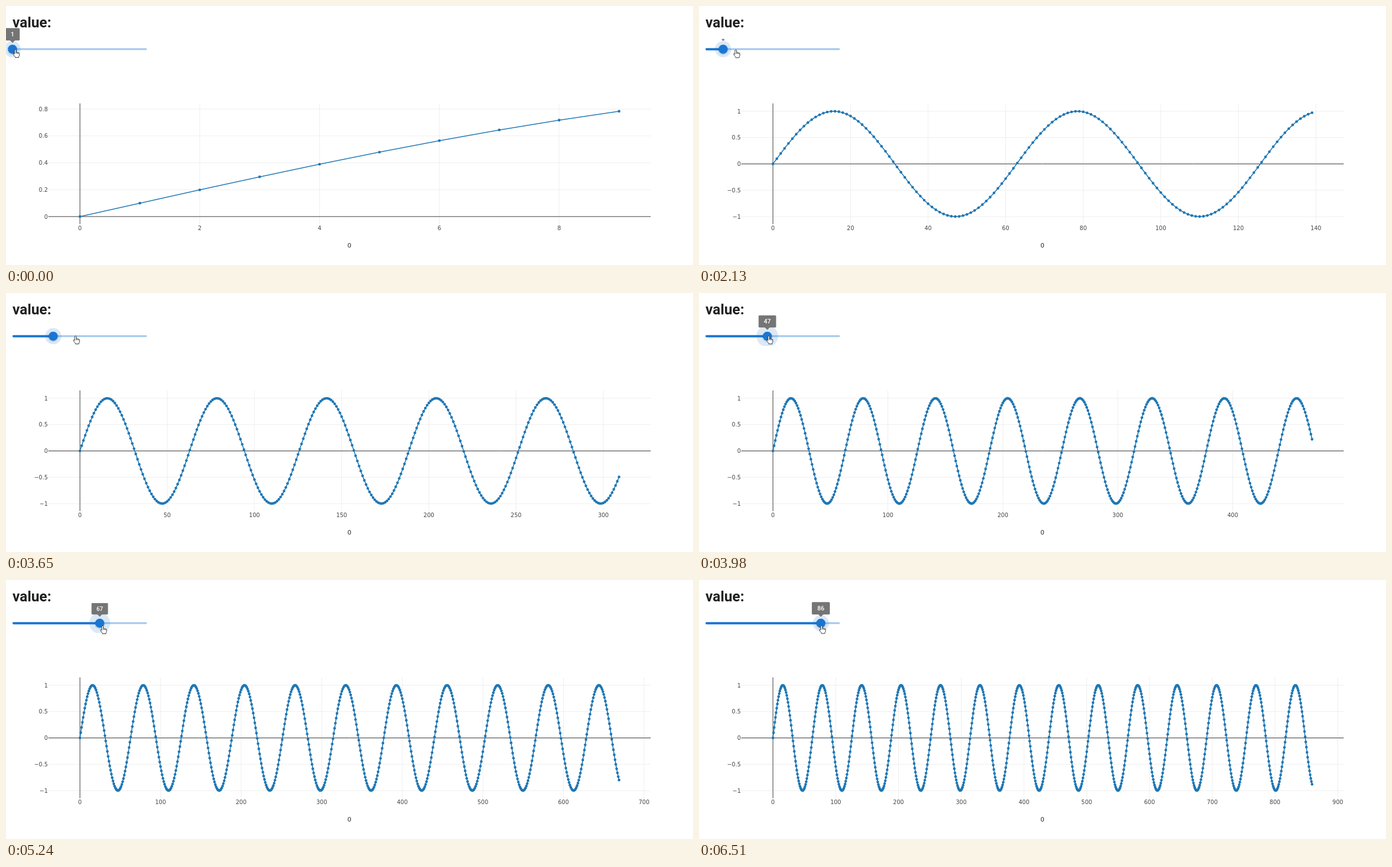
These frames come from a looping animation (1217 px wide and 460 px high, 7970 ms). An HTML page with a canvas:

```html
<!DOCTYPE html>
<html lang="en">
<head>
<meta charset="utf-8">
<title>Slider and sine plot</title>
<style>
  html, body { margin: 0; width: 100%; height: 100%; overflow: hidden; background: #fff; }
  canvas { display: block; }
</style>
</head>
<body>
<canvas id="stage" width="1217" height="460"></canvas>
<script>
const ctx = document.getElementById('stage').getContext('2d');
const LOOP = 7970, BLUE = '#1976d2', PLOT_BLUE = '#1f77b4';
const PLOT = { left: 75, right: 1142, top: 173, bottom: 387.5, x0: 131, x1: 1086, yMax: 187, yMin: 374 };
const SLIDER_Y = 76.7;

// press: click time, leave: pointer moves off, pulse: length of the halo swell
const steps = [
  { value: 1, press: -1000, leave: 580, pulse: 1 },
  { value: 14, press: 1320, leave: 1910, pulse: 130 },
  { value: 31, press: 2700, leave: 3240, pulse: 170 },
  { value: 47, press: 3860, leave: 4370, pulse: 260 },
  { value: 67, press: 5140, leave: 5560, pulse: 150 },
  { value: 86, press: 6335, leave: 1e6, pulse: 160 }
];
// time, fingertip x, fingertip y
const pointerPath = [
  [0, 16.5, 77], [580, 16.5, 77], [1260, 42.3, 79], [1910, 42.3, 79],
  [2650, 84.5, 76], [3240, 84.5, 76], [3710, 123.5, 76], [4370, 123.5, 76],
  [4980, 171, 81], [5560, 171, 81], [5840, 202.3, 75], [6310, 217, 80.5], [LOOP, 217, 80.5]
];

const clamp = k => Math.min(1, Math.max(0, k));
const ease = k => 1 - (1 - clamp(k)) ** 2.2;
const mix = (a, b, k) => a + (b - a) * k;
const thumbX = value => 11.5 + (value - 1) * 2.404;

function line(x1, y1, x2, y2, color, width = 1) {
  ctx.strokeStyle = color;
  ctx.lineWidth = width;
  ctx.beginPath();
  ctx.moveTo(x1, y1);
  ctx.lineTo(x2, y2);
  ctx.stroke();
}

function disc(x, y, r, color) {
  ctx.fillStyle = color;
  ctx.beginPath();
  ctx.arc(x, y, r, 0, 7);
  ctx.fill();
}

function text(str, x, y, font, color, align = 'center') {
  ctx.font = font;
  ctx.fillStyle = color;
  ctx.textAlign = align;
  ctx.fillText(str, x, y);
}

// Round tick spacing of the 1-2-5 series
function tickStep(rough) {
  const base = 10 ** Math.floor(Math.log10(rough));
  return base * [1, 2, 5, 10].find(m => m * base >= rough);
}

function ticks(step, from, to) {
  const list = [];
  for (let i = Math.ceil(from / step); i * step <= to; i++) list.push(i * step);
  return list;
}

function drawPlot(value) {
  const last = value * 10 - 1;
  const data = Array.from({ length: last + 1 }, (_, i) => Math.sin(i / 10));
  const low = Math.min(...data), high = Math.max(...data);
  const px = v => PLOT.x0 + v / last * (PLOT.x1 - PLOT.x0);
  const py = v => mix(PLOT.yMin, PLOT.yMax, (v - low) / (high - low));
  const label = v => String(+v.toFixed(2)).replace('-', '\u2212');
  const font = '10px "DejaVu Sans", sans-serif';
  const pad = (high - low) * 0.073;

  for (const v of ticks(tickStep(last * 1.117 / 9.9), 0, last * 1.0586)) {
    const x = px(v);
    if (v) line(x, PLOT.top, x, PLOT.bottom, '#eee');
    text(label(v), x, 398, font, '#444');
  }
  for (const v of ticks(high > 0.9 ? 0.5 : 0.2, low - pad, high + pad)) {
    const y = py(v);
    if (v) line(PLOT.left, y, PLOT.right, y, '#eee');
    text(label(v), 74, y + 3.7, font, '#444', 'right');
  }
  line(PLOT.left, py(0), PLOT.right, py(0), '#333');
  line(PLOT.x0, PLOT.top, PLOT.x0, PLOT.bottom, '#333');

  ctx.strokeStyle = PLOT_BLUE;
  ctx.lineWidth = 1.6;
  ctx.lineJoin = 'round';
  ctx.beginPath();
  data.forEach((v, i) => ctx.lineTo(px(i), py(v)));
  ctx.stroke();
  data.forEach((v, i) => disc(px(i), py(v), 2.4, PLOT_BLUE));
  text('0', 608.3, 429, '11.2px "DejaVu Sans", sans-serif', '#2a3038');
}

function drawTooltip(x, value, scale) {
  if (scale < 0.02) return;
  const width = value < 10 ? 25.6 : 31.9;
  ctx.save();
  ctx.translate(x, 61.2);
  ctx.scale(scale, scale);
  ctx.fillStyle = '#757575';
  ctx.beginPath();
  ctx.roundRect(-width / 2, -22, width, 22, 1.6);
  ctx.fill();
  ctx.beginPath();
  ctx.moveTo(-4.5, -0.2);
  ctx.lineTo(4.5, -0.2);
  ctx.lineTo(0, 4.4);
  ctx.fill();
  text(value, 0, -7.2, '500 11.2px Roboto, sans-serif', '#fff');
  ctx.restore();
}

function drawSlider(t, index) {
  const step = steps[index], previous = steps[Math.max(0, index - 1)];
  const grow = ease((t - step.press) / 150);
  const hide = ease((t - step.leave - 130) / 150);
  const x = mix(thumbX(previous.value), thumbX(step.value), grow);
  const focus = index === 0 ? 1 - hide : index === 1 ? grow : 1;
  const swell = Math.sin(Math.PI * clamp((t - step.press) / step.pulse));

  ctx.lineCap = 'round';
  line(13, SLIDER_Y, 248, SLIDER_Y, '#a7caed', 3.2);
  if (x > 13.5) line(13.5, SLIDER_Y, x, SLIDER_Y, BLUE, 4);
  ctx.lineCap = 'butt';

  ctx.save();
  ctx.beginPath();
  ctx.rect(0, 0, 1217, 94);
  ctx.clip();
  disc(x, SLIDER_Y, 8 + 6.4 * focus + 4.8 * swell, 'rgba(25,118,210,.16)');
  ctx.restore();

  ctx.save();
  ctx.shadowColor = 'rgba(0,0,0,.3)';
  ctx.shadowBlur = 3;
  ctx.shadowOffsetY = 1;
  disc(x, SLIDER_Y, 8, BLUE);
  ctx.restore();
  drawTooltip(x, step.value, grow * (1 - hide));
}

const hand = new Path2D('M-1.4 1.2Q0 -.8 1.4 1.2V5Q2.7 4.2 3.5 5.5Q4.8 4.8 5.5 6.1' +
  'Q7 5.8 7.2 7.4V10Q7.2 11.5 6 13V14.5H-.2V13.2Q-1.8 11.8 -3.6 8.6Q-4 6.8 -2.5 7.2L-1.4 8.4Z');
const knuckles = new Path2D('M1.4 5V7.6M3.5 5.6V7.8M5.5 6.2V8');

function drawPointer(t) {
  const next = Math.max(1, pointerPath.findIndex(p => p[0] > t));
  const [t0, x0, y0] = pointerPath[next - 1], [t1, x1, y1] = pointerPath[next];
  const k = ease((t - t0) / (t1 - t0));
  ctx.save();
  ctx.translate(mix(x0, x1, k), mix(y0, y1, k));
  ctx.fillStyle = '#fff';
  ctx.strokeStyle = '#222';
  ctx.lineWidth = 0.9;
  ctx.fill(hand);
  ctx.stroke(hand);
  ctx.stroke(knuckles);
  ctx.restore();
}

function draw(now) {
  const t = now % LOOP;
  const current = delay => steps.findLastIndex(s => t >= s.press + delay);
  ctx.fillStyle = '#fff';
  ctx.fillRect(0, 0, 1217, 460);
  text('value:', 11.5, 38, '700 25.6px Roboto, sans-serif', '#212121', 'left');
  drawPlot(steps[current(90)].value);
  drawSlider(t, current(0));
  drawPointer(t);
  requestAnimationFrame(draw);
}
requestAnimationFrame(draw);
</script>
</body>
</html>
```
